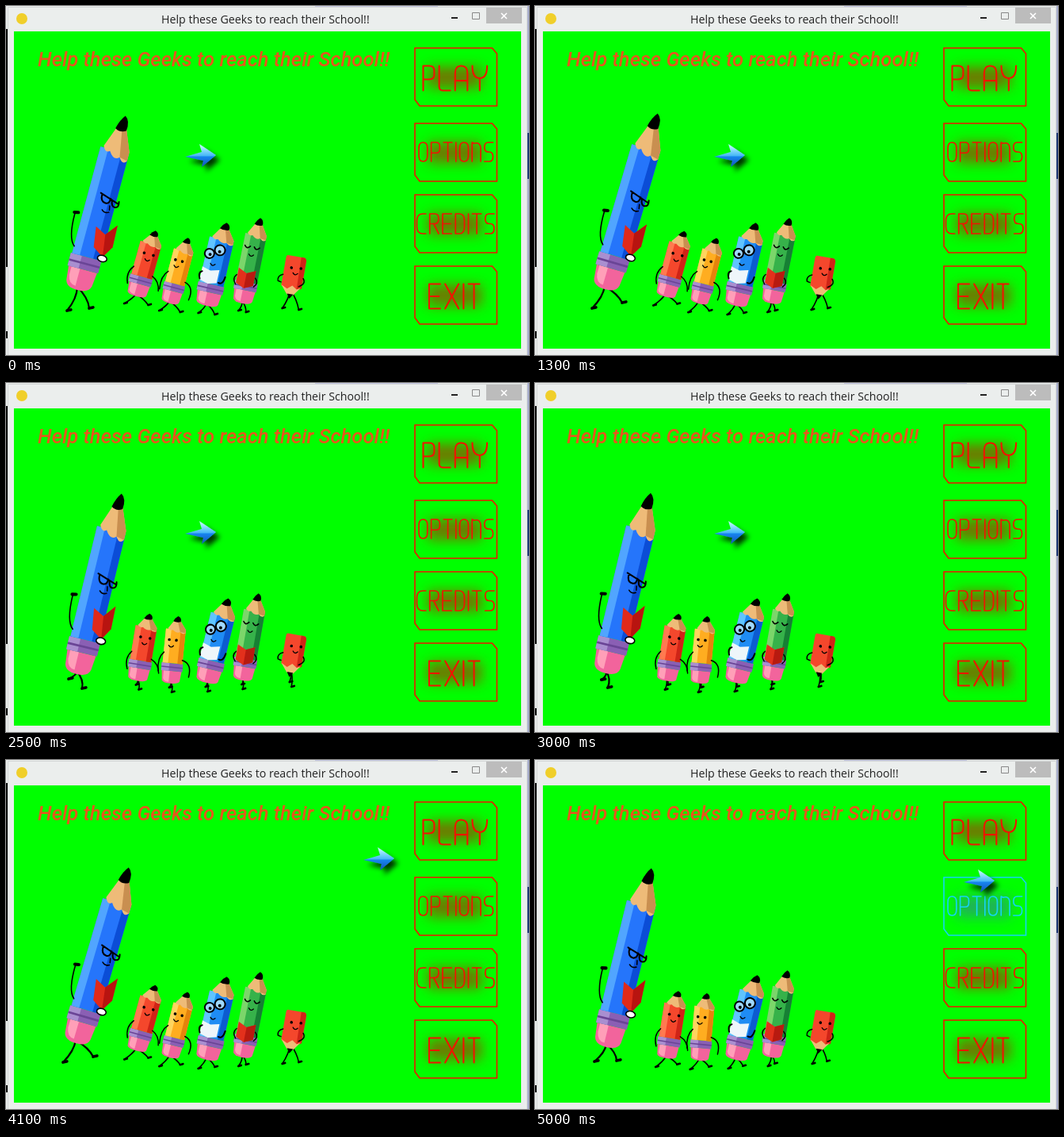
An HTML page that plays this animation: 660x440 px, repeating every 5.1 s.

```html
<!DOCTYPE html>
<html lang="en">
<head>
<meta charset="utf-8">
<title>Help these Geeks to reach their School!!</title>
<style>
  html, body { margin: 0; width: 100%; height: 100%; overflow: hidden; background: #ebeeed; }
  svg { display: block; width: 660px; height: 440px; }
  .line { fill: none; stroke-linecap: round; stroke-linejoin: round; }
  .ink { stroke: #000; }
  .button { --tint: #f01400; --glow: #a03c00; }
  .button.hover { --tint: #14d4f4; --glow: #2f9080; }
  .frame { fill: none; stroke: var(--tint); stroke-width: 1.6; }
  .word { stroke: var(--tint); stroke-width: 1.35; }
  .glow { fill: var(--glow); opacity: .7; }
</style>
</head>
<body>
<svg viewBox="0 0 660 440">
  <defs>
    <filter id="blur" x="-40%" y="-100%" width="180%" height="300%"><feGaussianBlur stdDeviation="8"/></filter>
    <filter id="shadow" x="-40%" y="-40%" width="200%" height="200%">
      <feDropShadow dx="5" dy="6" stdDeviation="3" flood-opacity=".8"/>
    </filter>
    <linearGradient id="sky" x2="0" y2="1">
      <stop offset=".1" stop-color="#b5f3ff"/><stop offset=".5" stop-color="#48b8f6"/>
      <stop offset=".56" stop-color="#1684ee"/><stop offset="1" stop-color="#1450b8"/>
    </linearGradient>
  </defs>

  <rect width="660" height="440" fill="#ebeeed"/>
  <path d="M390 0H545V1.5H390Z" fill="#c6c9e4"/>
  <path d="M0 29H2V329H0ZM0 410H2V419H0Z"/>
  <path d="M658 0H660V440H658Z" fill="#a9b0cf"/>
  <path d="M658 160H660V218H658Z" fill="#203a78"/>
  <path d="M2.5 440V1.5H657.5V440" fill="none" stroke="#d3d6d6"/>
  <circle cx="20" cy="16" r="7" fill="#f0cf2a"/>
  <text x="196" y="22" font-family="'Open Sans', sans-serif" font-size="14.2" fill="#222">Help these Geeks to reach their School!!</text>
  <path d="M562 15H570" stroke="#222" stroke-width="2"/>
  <path d="M588.5 8.5H597.5V16.5H588.5Z" fill="none" stroke="#888"/>
  <path d="M606 2H651V22H606Z" fill="#bcbcbc"/>
  <path d="M625 9L632 16M632 9L625 16" stroke="#fff" stroke-width="1.6"/>

  <rect x="10" y="32" width="640" height="400" fill="#0f0"/>
  <text x="40" y="76" font-family="Roboto, sans-serif" font-size="25.6" font-weight="500" font-style="italic" fill="#e8551c">Help these Geeks to reach their School!!</text>
  <g id="buttons"></g>
  <g id="walkers"></g>
  <path id="cursor" d="M-19 2L2 -4L-1 -14L20 0L2 15L4 7Z" fill="url(#sky)" filter="url(#shadow)"/>
</svg>
<script>
const LOOP = 5100, STEP = 100;
// The walk has 14 poses and moves on by 3 of them in every step.
const POSES = 14, POSES_PER_STEP = 3;
const $ = id => document.getElementById(id);

// ---- menu ----
// Neon letters: [width, stroke path], 20 units high.
const GLYPHS = {
  P: [9, 'M0 20V0H5Q9 0 9 4V7Q9 11 5 11H0'],
  L: [9, 'M0 0V17Q0 20 3 20H9'],
  A: [10, 'M0 20V6Q0 0 5 0T10 6V20M0 12H10'],
  Y: [12, 'M0 0Q0 10 6 10T12 0M6 10V20'],
  O: [9, 'M4.5 0Q0 0 0 6V14Q0 20 4.5 20T9 14V6Q9 0 4.5 0Z'],
  T: [9, 'M0 0H9M4.5 0V20'],
  I: [0, 'M0 0V20'],
  N: [9, 'M0 20V0L2 1Q9 -1 9 7V20'],
  S: [9, 'M9 0H4Q0 0 0 5T4 10H5Q9 10 9 15T5 20H0'],
  C: [9, 'M9 0H6Q0 0 0 7V13Q0 20 6 20H9'],
  R: [9, 'M0 20V0H5Q9 0 9 5T5 10H0M4 10L9 20'],
  E: [9, 'M9 0H0V20H9M0 10H8'],
  D: [9, 'M0 0V20H4Q9 20 9 13V7Q9 0 4 0Z'],
  X: [11, 'M0 0L11 20M11 0L0 20'],
};
const GAP = 4;
const MENU = [
  { word: 'PLAY', top: 52, x: 526.5, y: 75.5, size: 1.55 },
  { word: 'OPTIONS', top: 147, x: 521, y: 172, size: 1.2 },
  { word: 'CREDITS', top: 237, x: 518.5, y: 262, size: 1.25 },
  { word: 'EXIT', top: 327, x: 534, y: 350.5, size: 1.55 },
];
const button = ({ word, top, x, y, size }) => {
  let pen = 0;
  const letters = [...word].map(c => {
    const [width, d] = GLYPHS[c];
    const path = `<path d="${d}" transform="translate(${pen})"/>`;
    pen += width + GAP;
    return path;
  }).join('');
  return `<g class="button" role="button" aria-label="${word}">
    <rect class="glow" x="532" y="${top + 25}" width="68" height="26" filter="url(#blur)"/>
    <path class="frame" d="M516 ${top + 1}h97.5l6 7v66h-97.5l-6-8z"/>
    <g class="line word" transform="translate(${x} ${y}) scale(${size})">${letters}</g></g>`;
};
$('buttons').innerHTML = MENU.map(button).join('');

// ---- drawing helpers ----
const fill = (d, color) => `<path d="${d}" fill="${color}"/>`;
const ink = (d, weight = 1.6) => `<path class="line ink" d="${d}" stroke-width="${weight}"/>`;
const dot = (x, y, r, color = '#000') => `<circle cx="${x}" cy="${y}" r="${r}" fill="${color}"/>`;
const ring = (x, y, r) => `<circle class="ink" cx="${x}" cy="${y}" r="${r}" fill="#9fd8ff" stroke-width="2"/>`;

// Upright pencil standing on the origin: half width w, length l, metal band up to `band`.
function pencil(w, l, band, [light, main, dark]) {
  const at = k => -l * k;
  const box = (x1, x2, y1, y2) => `M${x1 * w} ${at(y1)}H${x2 * w}V${at(y2)}H${x1 * w}Z`;
  const low = band * .62;
  return fill(`M${-w} ${at(low)}L${-w * .9} ${at(.04)}Q${-w * .8} 0 0 0T${w * .9} ${at(.04)}L${w} ${at(low)}Z`, '#f2649c') +
    fill(`M${-w * .8} ${at(low)}V${at(.07)}Q${-w * .7} ${at(.02)} ${-w * .2} ${at(.02)}V${at(low)}Z`, '#ff9fb8') +
    fill(box(-1.08, 1.08, low, band), '#8a5fb4') +
    fill(box(-1.08, -.3, low, band), '#a98fd0') +
    fill(box(-1.08, 1.08, band * .77, band * .83), '#6a4596') +
    fill(box(-1, 1, band, .8), main) +
    fill(box(-1, -.45, band, .8), light) +
    fill(box(.5, 1, band, .8), dark) +
    fill(`M${-w * .8} ${at(.81)}L${-w * .25} ${at(.93)}H${w * .4}L${w} ${at(.81)}V${at(.76)}
      Q${w * .75} ${at(.73)} ${w * .45} ${at(.77)}Q${w * .1} ${at(.74)} ${-w * .3} ${at(.79)}
      Q${-w * .6} ${at(.77)} ${-w * .8} ${at(.81)}Z`, '#eebb78') +
    fill(`M${w * .1} ${at(.93)}H${w * .4}L${w} ${at(.81)}V${at(.76)}L${w * .45} ${at(.77)}Z`, '#c98f50') +
    fill(`M${-w * .34} ${at(.92)}Q${-w * .2} ${at(.97)} ${w * .1} ${at(1)}Q${w * .5} ${at(.98)} ${w * .42} ${at(.92)}Q0 ${at(.9)} ${-w * .34} ${at(.92)}Z`, '#000');
}

const smile = (x, y) => ink(`M${x - 3} ${y}q3 4 6 0`, 1.3);
const TEACHER_LENGTH = 226;
const ART = {
  teacher: pencil(18.5, TEACHER_LENGTH, .19, ['#51a5ff', '#2575fb', '#0b4dd6']) +
    ink('M-3 -125L22 -117M-1 -124q0 10 7 10q5 0 5 -7M13 -120q1 9 6 8q5 -1 3 -8', 2) +
    ink('M4 -105q4 4 9 1M12 -112l1 5', 1.5) +
    fill('M2 -83L16 -76L28 -91L29 -63L20 -48L6 -57Z', '#e02a1a') +
    fill('M16 -76L28 -91L29 -63L20 -48Z', '#b81410') +
    `<ellipse class="ink" cx="20" cy="-46" rx="6" ry="4" fill="#fff" stroke-width="1.6"/>` +
    ink('M-18 -52Q-28 -60 -28 -92') + ink('M-29 -93l5 -1', 4),
  red: pencil(13.5, 87, .3, ['#ff7a50', '#f4472c', '#cf2417']) +
    dot(-5, -56, 1.8) + dot(7, -56, 1.8) + smile(1, -49) +
    ink('M-13 -36Q-21 -26 -15 -13M13 -30Q23 -26 25 -14', 1.5),
  yellow: pencil(12.5, 84, .3, ['#ffd45e', '#ffad20', '#e5830c']) +
    dot(-7, -54, 1.8) + dot(2, -54, 1.8) + smile(-4, -47) +
    ink('M-12 -38Q-20 -30 -17 -14M12 -30Q25 -27 22 -10', 1.5),
  reader: pencil(15.5, 109, .26, ['#60c4ff', '#1f8cf4', '#0c5cd0']) +
    ring(-11, -66, 6) + ring(1, -73, 6.5) + dot(-10, -65, 2) + dot(1, -71, 2) + smile(-4, -54) +
    fill('M-16 -48L-5 -45L6 -48V-31L-5 -28L-16 -31Z', '#eef6fa') +
    ink('M-16 -32Q-20 -40 -15 -42M8 -32q6 2 7 -9', 2),
  dreamer: pencil(13.5, 109, .25, ['#7bd66a', '#36b24a', '#168034']) +
    ink('M-11 -72q3 5 7 0M1 -72q3 5 7 0', 1.6) + smile(-1, -62) +
    fill('M-13 -43L-2 -38L9 -43V-24L-2 -19L-13 -24Z', '#e3301c') +
    fill('M-2 -38L9 -43V-24L-2 -19Z', '#b81a10') +
    ink('M-14 -34q-5 6 1 12M10 -34q6 5 0 11', 1.5),
  stub: fill('M-11 -22H10Q13 -21 13 -18V17L7 20L1 16L-5 21L-13 17V-18Q-13 -22 -11 -22Z', '#f4472c') +
    fill('M6 -22H10Q13 -21 13 -18V17L7 20Z', '#cf2417') +
    fill('M-13 16L-5 20L1 15L7 19L12 16L4 27H-4Z', '#eebb78') + fill('M-4 26H4L0 32Z', '#000') +
    dot(-4, -7, 1.8) + dot(8, -8, 1.8) + smile(2, -1) +
    ink('M-13 3Q-20 6 -18 12L-14 13M13 4Q18 10 9 15', 1.5),
};

// ---- motion ----
// Keys are [time, ...values]; returns the values interpolated at `t`.
function track(keys, t) {
  const i = Math.max(1, keys.findIndex(k => k[0] >= t));
  const [a, b] = [keys[i - 1], keys[i]];
  const k = (t - a[0]) / (b[0] - a[0]);
  return a.slice(1).map((v, j) => v + (b[j + 1] - v) * k);
}

// pose, base, tip, swinging foot, planted foot; the feet trade roles at the end
const TEACHER = [
  [0, 90, 358, 149, 138, 77, 384, 105, 381],
  [4, 90, 369, 141, 143, 83, 380, 100, 382],
  [5, 89, 367, 144, 139, 79, 373, 96, 385],
  [10, 90, 362, 145, 136, 103, 379, 75, 380],
  [11, 88, 357, 153, 135, 110, 374, 72, 381],
  [14, 90, 358, 149, 138, 105, 381, 77, 384],
];
const SWAY = [[0, 1], [4, .3], [5, -.9], [10, -1], [11, .9], [14, 1]];
// base and tip, each with its shift per unit of sway
const PUPILS = [
  { art: 'red', length: 87, base: [165, 371], tip: [183.5, 287], baseSway: [-.7, -5], tipSway: [4, -4], stride: 16 },
  { art: 'yellow', length: 84, base: [207, 377], tip: [222, 293], baseSway: [-.5, -2], tipSway: [6.5, -1], stride: 14 },
  { art: 'reader', length: 109, base: [253, 378], tip: [278, 272], baseSway: [0, 0], tipSway: [-1, 1], stride: 11 },
  { art: 'dreamer', length: 109, base: [298, 375], tip: [318.5, 266], baseSway: [0, 0], tipSway: [1.3, 1], stride: 5 },
];
const WIDEST_POSE = 12.5;
const CURSOR = [
  [0, 245, 188], [3600, 245, 188], [4100, 470, 124], [4200, 525, 110],
  [4500, 560, 98], [4800, 562, 130], [5000, 560, 152],
];

const place = (art, x, y, angle, stretch = 1) =>
  `<g transform="translate(${x} ${y}) rotate(${angle}) scale(1 ${stretch})">${ART[art]}</g>`;
const stand = (art, length, bx, by, tx, ty) =>
  place(art, bx, by, Math.atan2(tx - bx, by - ty) * 180 / Math.PI, Math.hypot(tx - bx, ty - by) / length);
const leg = (hx, hy, fx, fy, weight, bend) =>
  ink(`M${hx} ${hy}Q${(hx + fx) / 2 + bend} ${(hy + fy) / 2} ${fx} ${fy}`, weight) +
  ink(`M${fx} ${fy}l${weight * 2.2} -1`, weight * 1.7);

function teacher(pose) {
  const [bx, by, tx, ty, ax, ay, cx, cy] = track(TEACHER, pose);
  return leg(bx, by - 4, ax, ay, 2.2, 6) + leg(bx, by - 4, cx, cy, 2.2, 6) +
    stand('teacher', TEACHER_LENGTH, bx, by, tx, ty);
}

// One cycle of poses is a single stride, so each foot takes two cycles to return.
function feet(x, y, ground, stride, pose) {
  const angle = (pose - WIDEST_POSE) / POSES * Math.PI;
  const foot = a =>
    leg(x, y, x + stride * Math.cos(a), ground - 6 * Math.max(0, -Math.sin(a)), 1.6, 3);
  return foot(angle) + foot(angle + Math.PI);
}

function pupil({ art, length, base, tip, baseSway, tipSway, stride }, pose) {
  const [s] = track(SWAY, pose);
  const [bx, by] = base.map((v, i) => v + baseSway[i] * s);
  const [tx, ty] = tip.map((v, i) => v + tipSway[i] * s);
  return feet(bx, by - 3, by + 11, stride, pose) + stand(art, length, bx, by, tx, ty);
}

function stub(pose) {
  const y = 338.5 - Math.cos(pose / POSES * 2 * Math.PI);
  return feet(359, y + 20, 383, 11, pose) + place('stub', 363, y, 10);
}

let shown = -1;
function render(now) {
  const frame = Math.floor(now % LOOP / STEP);
  if (frame !== shown) {
    shown = frame;
    const pose = frame * POSES_PER_STEP % POSES;
    $('walkers').innerHTML = teacher(pose) + PUPILS.map(p => pupil(p, pose)).join('') + stub(pose);
    const [x, y] = track(CURSOR, frame * STEP);
    $('cursor').setAttribute('transform', `translate(${x} ${y})`);
    [...$('buttons').children].forEach((el, i) => {
      const dy = y - MENU[i].top;
      el.classList.toggle('hover', x > 515 && x < 620 && dy > 0 && dy < 75);
    });
  }
  requestAnimationFrame(() => render(performance.now()));
}
render(performance.now());
</script>
</body>
</html>
```
